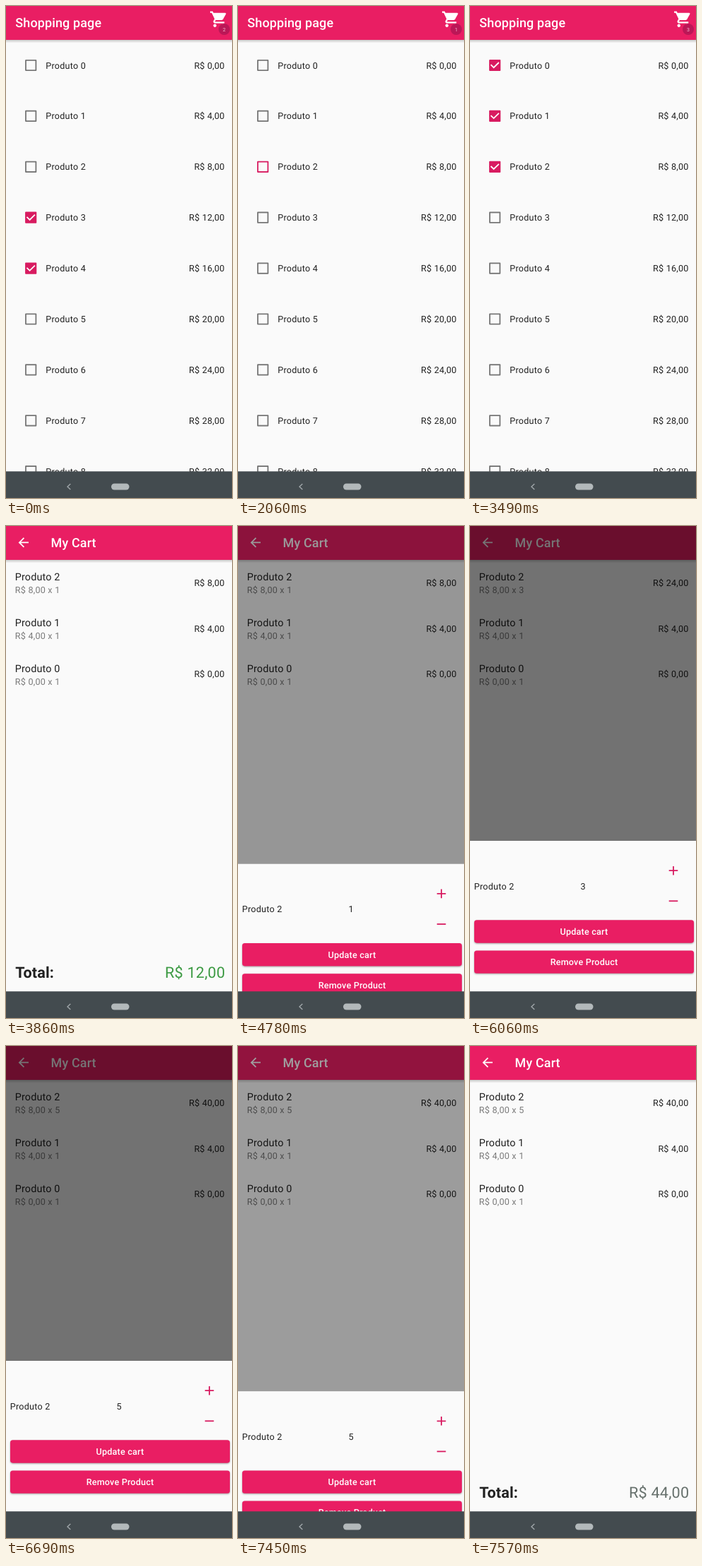
Write an HTML page that moves like this. It is 320 by 697 pixels and loops after 8000 ms.

```html
<!DOCTYPE html>
<html lang="pt">
<head>
<meta charset="utf-8">
<title>Shopping page</title>
<style>
  html, body { margin: 0; width: 100%; height: 100%; overflow: hidden; background: #fafafa; }
  svg { display: block; width: 100vw; height: 100vh; }
  text { font-family: Roboto, "Noto Sans", sans-serif; white-space: pre; text-rendering: geometricPrecision; }
  .body { font-size: 12.58px; letter-spacing: .225px; fill: #212121; }
  .item { font-size: 14.38px; letter-spacing: .135px; fill: #212121; }
  .sub { font-size: 12.58px; letter-spacing: .225px; fill: #7a7a7a; }
  .head { font-size: 17.97px; font-weight: 500; letter-spacing: .135px; fill: #fff; }
  .total { font-size: 21.57px; font-weight: 700; letter-spacing: .1px; fill: #212121; }
  .sum { font-size: 21.57px; letter-spacing: .225px; }
  .btn { font-size: 12.58px; font-weight: 500; letter-spacing: .2px; fill: #fff; text-anchor: middle; }
  .raised { filter: drop-shadow(0 1px 1px rgba(0, 0, 0, .35)); }
  .badge { font-size: 7px; fill: #f8bbd0; text-anchor: middle; }
  .end { text-anchor: end; }
</style>
</head>
<body>
<svg viewBox="0 0 320 697" preserveAspectRatio="none">
  <defs>
    <linearGradient id="fade" x1="0" y1="0" x2="0" y2="1">
      <stop offset="0" stop-color="#000" stop-opacity=".2"/>
      <stop offset="1" stop-color="#000" stop-opacity="0"/>
    </linearGradient>
  </defs>
  <g id="shop"></g>
  <g id="cart"></g>
  <rect id="scrim" width="320" height="660"/>
  <g id="sheet"></g>
  <g id="nav">
    <rect y="659.300" width="320" height="38" fill="#434b4f"/>
    <path d="M91.300 677l-4.300 4 4.300 4" fill="none" stroke="#a3aaad" stroke-width="1.300"/>
    <rect x="149" y="676.500" width="25.500" height="9" rx="4.500" fill="#b3b9bb"/>
  </g>
</svg>
<script>
const LOOP = 8000, PINK = '#e91e63', ACCENT = '#d81b60', PAPER = '#fafafa';
const PAGE_H = 659, SHEET_H = 213, UNIT = 0.8987;

// The screen refreshes only in these bursts: start, end, steps
const BURSTS = [
  [80, 210, 3], [630, 630, 1], [990, 1120, 3], [1390, 1630, 4],
  [2060, 2180, 3], [2430, 2550, 3], [2770, 2900, 3], [3490, 3490, 1],
  [3670, 3860, 4], [4780, 4900, 3], [5430, 5430, 1], [5720, 6490, 12],
  [6550, 6690, 3], [7390, 7570, 4]
];
const REFRESH = [0];
for (const [a, b, n] of BURSTS)
  for (let i = 0; i < n; i++) REFRESH.push(n > 1 ? a + (b - a) * i / (n - 1) : a);

// Taps on the list: time, row, new state
const TOGGLES = [[990, 4, 0], [1390, 3, 0], [2060, 2, 1], [2430, 1, 1], [2770, 0, 1]];
const PLUS_TAPS = [5715, 5925, 6205, 6415];
const OPEN_CART = 3600, OPEN_SHEET = 4628, CLOSE_SHEET = 7360;

const $ = id => document.getElementById(id);
const ramp = (t, start, len) => Math.min(1, Math.max(0, (t - start) / len));
const easeOut = v => 1 - (1 - v) ** 2;
const money = n => `R$ ${n},00`;

function add(parent, tag, attrs, text) {
  const node = document.createElementNS('http://www.w3.org/2000/svg', tag);
  for (const k in attrs) node.setAttribute(k, attrs[k]);
  if (text !== undefined) node.textContent = text;
  return parent.appendChild(node);
}
const label = (parent, cls, x, y, text) => add(parent, 'text', { class: cls, x, y }, text);
const icon = (parent, x, y, scale, fill, d) =>
  add(parent, 'path', { d, fill, transform: `translate(${x} ${y}) scale(${scale})` });

function page(parent, x, title) {
  add(parent, 'rect', { width: 320, height: 900, fill: PAPER });
  add(parent, 'rect', { y: 48, width: 320, height: 4.5, fill: 'url(#fade)' });
  add(parent, 'rect', { width: 320, height: 48, fill: PINK });
  label(parent, 'head', x, 30.2, title);
}

function checkbox(parent, cy) {
  const g = add(parent, 'g', { transform: `translate(35.2 ${cy})` });
  const box = add(g, 'rect', { x: -8.1, y: -8.1, width: 16.2, height: 16.2, rx: 1 });
  const hole = add(g, 'rect', { x: -6.3, y: -6.3, width: 12.6, height: 12.6, fill: PAPER });
  const tick = add(g, 'path', {
    d: 'M-5.700-.800L-1.600 3.200 5.700-4', fill: 'none', stroke: '#fff',
    'stroke-width': 1.8, pathLength: 1, 'stroke-dasharray': '1 2'
  });
  return (v, active) => {
    const drawn = Math.max(0, 2 * v - 1);
    box.setAttribute('fill', active ? ACCENT : '#757575');
    hole.setAttribute('transform', `scale(${Math.max(0, 1 - 2 * v)})`);
    tick.setAttribute('stroke-dashoffset', 1 - drawn);
    tick.setAttribute('opacity', drawn > 0 ? 1 : 0);
  };
}

// Shopping page
const shop = $('shop');
page(shop, 13.3, 'Shopping page');
icon(shop, 287.9, 5.3, 1.123, '#fff',
  'M7 18c-1.100 0-1.990.9-1.990 2S5.900 22 7 22s2-.9 2-2-.9-2-2-2zM1 2v2h2l3.600 7.590-1.350 2.450c-.16.28-.25.61-.25.96 0 1.100.9 2 2 2h12v-2H7.420c-.14 0-.25-.11-.25-.25l.03-.12.9-1.630h7.450c.75 0 1.410-.41 1.750-1.030l3.580-6.490A1 1 0 0 0 20 4H5.210l-.94-2H1zm16 16c-1.100 0-1.990.9-1.990 2s.89 2 1.990 2 2-.9 2-2-.9-2-2-2z');
add(shop, 'circle', { cx: 309, cy: 33, r: 8, fill: '#bb1757' });
const badge = label(shop, 'badge', 309, 35.5, '2');
const boxes = [];
for (let i = 0; i < 9; i++) {
  const y = 84 + 71.9 * i;
  boxes.push(checkbox(shop, y));
  label(shop, 'body', 56.3, y + 4.5, `Produto ${i}`);
  label(shop, 'body end', 309.6, y + 4.5, money(4 * i));
}

// Cart page
const cart = $('cart');
page(cart, 63.6, 'My Cart');
icon(cart, 14, 12.6, UNIT, '#fff', 'M20 11H7.830l5.590-5.590L12 4l-8 8 8 8 1.410-1.410L7.830 13H20v-2z');
const lines = [2, 1, 0].map((id, i) => {
  const y = 64.7 * i;
  label(cart, 'item', 12.8, y + 77.1, `Produto ${id}`);
  return {
    price: 4 * id,
    sub: label(cart, 'sub', 12.8, y + 95.2, ''),
    cost: label(cart, 'body end', 309.6, y + 85, '')
  };
});
label(cart, 'total', 13.3, 640, 'Total:');
const sum = label(cart, 'sum end', 310.3, 640, '');

// Bottom sheet
const sheet = $('sheet');
add(sheet, 'rect', { y: 446, width: 320, height: SHEET_H + 1, fill: PAPER });
label(sheet, 'body', 5.8, 514.5, 'Produto 2');
const count = label(sheet, 'body', 156.4, 514.5, '1');
icon(sheet, 277.2, 477.4, UNIT, ACCENT, 'M19 13h-6v6h-2v-6H5v-2h6V5h2v6h6v2z');
icon(sheet, 277.2, 520.5, UNIT, ACCENT, 'M19 13H5v-2h14v2z');
[['Update cart', 558.3], ['Remove Product', 601.4]].forEach(([text, y]) => {
  add(sheet, 'rect', { class: 'raised', x: 6, y, width: 311, height: 36 * UNIT, rx: 4 * UNIT, fill: PINK });
  label(sheet, 'btn', 161.5, y + 20.7, text);
});

// cubic-bezier(.4, 0, .2, 1), solved for x
function fastOutSlowIn(x) {
  let lo = 0, hi = 1;
  for (let i = 0; i < 20; i++) {
    const s = (lo + hi) / 2, r = 1 - s;
    if (1.2 * r * r * s + .6 * r * s * s + s ** 3 < x) lo = s; else hi = s;
  }
  return 3 * (1 - lo) * lo * lo + lo ** 3;
}

function drawShop(t) {
  const state = boxes.map((_, i) => {
    const on = i === 3 || i === 4;
    return { v: +on, on };
  });
  for (const [at, row, on] of TOGGLES) {
    if (t < at) continue;
    const k = ramp(t, at, 115);
    state[row] = { v: on ? k : 1 - k, on };
  }
  boxes.forEach((set, i) => set(state[i].v, state[i].on || state[i].v > 0));
  badge.textContent = state.filter(s => s.on).length;
}

function drawCart(t) {
  const v = ramp(t, OPEN_CART, 260);
  cart.setAttribute('opacity', v * v);
  cart.setAttribute('transform', `translate(0 ${PAGE_H / 4 * (1 - fastOutSlowIn(v))})`);
  const qty = 1 + PLUS_TAPS.filter(at => t >= at).length;
  let total = 0;
  lines.forEach((line, i) => {
    const n = i ? 1 : qty;
    line.sub.textContent = `${money(line.price)} x ${n}`;
    line.cost.textContent = money(line.price * n);
    total += line.price * n;
  });
  sum.textContent = money(total);
  sum.setAttribute('fill', qty > 1 ? '#66706c' : '#3c9a43');
  count.textContent = qty;
}

function drawSheet(t) {
  const v = ramp(t, OPEN_SHEET, 250) - ramp(t, CLOSE_SHEET, 200);
  sheet.setAttribute('transform', `translate(0 ${SHEET_H * (1 - easeOut(v))})`);
  sheet.setAttribute('visibility', v > 0 ? 'visible' : 'hidden');
  $('scrim').setAttribute('opacity', .54 * v ** .6);
}

function draw(now) {
  const time = now % LOOP;
  const t = REFRESH.filter(at => at <= time + .5).pop();
  drawShop(t);
  drawCart(t);
  drawSheet(t);
}

const begin = performance.now();
function tick() {
  draw(performance.now() - begin);
  requestAnimationFrame(tick);
}
tick();
</script>
</body>
</html>
```
